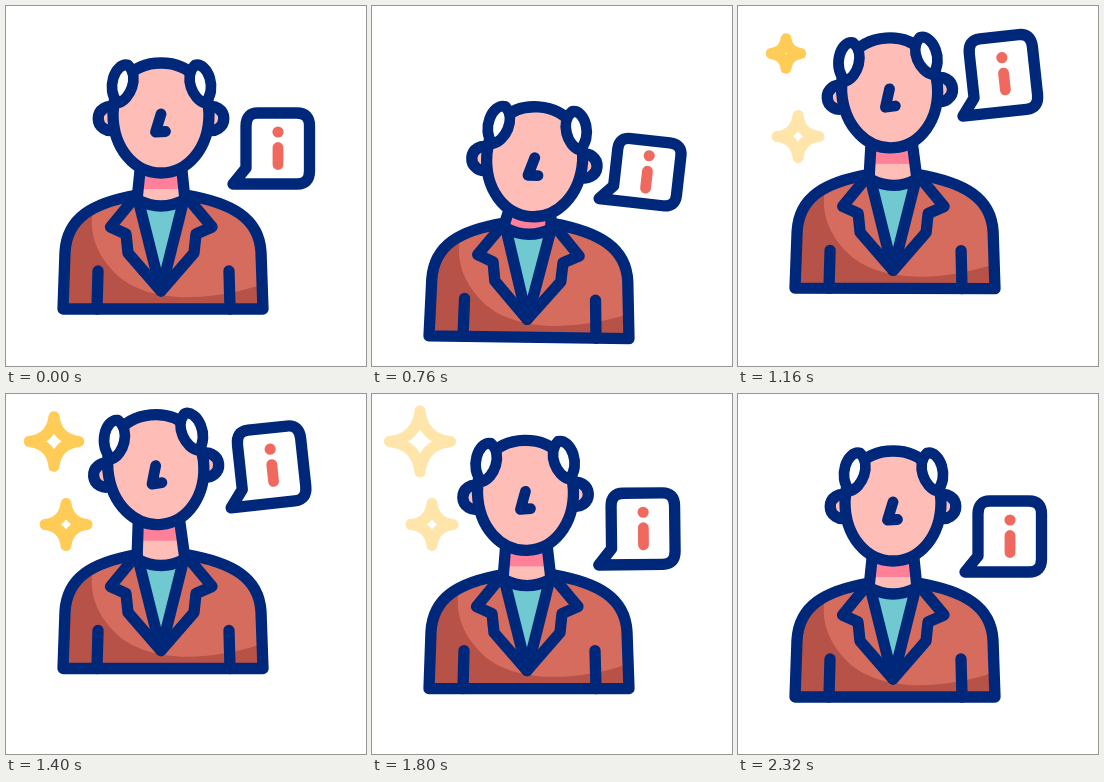
Animation of 360 by 360 pixels, one loop 2400 ms. Source, as an HTML page with a canvas:

```html
<!DOCTYPE html>
<html lang="en">
<head>
<meta charset="utf-8">
<title>Information</title>
<style>
  html, body { margin: 0; width: 100%; height: 100%; overflow: hidden; background: #fff; }
  canvas { display: block; width: 360px; height: 360px; }
</style>
</head>
<body>
<canvas id="stage"></canvas>
<script>
const LOOP = 2400, STEP = 40;
const NAVY = '#00287a', SKIN = '#ffbdb8', BLUSH = '#ff8098', COAT = '#d66c5e',
      SHADE = '#b75249', SHIRT = '#70c8d1', RED = '#f0695f', GOLD = '#ffcc57';

const canvas = document.getElementById('stage');
const ctx = canvas.getContext('2d');
const dpr = window.devicePixelRatio || 1;
canvas.width = canvas.height = 360 * dpr;

// Progress 0..1 between two times, slow at both ends
function ease(t, from, to) {
  const u = Math.min(1, Math.max(0, (t - from) / (to - from)));
  return (1 - Math.cos(Math.PI * u)) / 2;
}

// Every part sinks to a low pose, jumps to a high pose and settles at rest
function bounce(sunk, top, fall, rest) {
  return (t, low, high) => {
    const sink = ease(t, 220, sunk), jump = ease(t, 740, top), settle = ease(t, fall, rest);
    return low * sink * (1 - jump) + high * jump * (1 - settle);
  };
}
const bodyMove = bounce(640, 1300, 1340, 2060);
const headMove = bounce(740, 1300, 1340, 2060);
const bubbleMove = bounce(500, 1240, 1240, 1940);

const shapes = {
  torso: new Path2D('M131 189 C86 197 61 212 59 246 L57 303 H257 L255 246 C253 212 226 197 180 189'),
  shade: new Path2D('M50 185 H93 C78 218 87 247 112 270 C143 297 204 297 260 277 V310 H50 Z'),
  shirt: new Path2D('M132 194 Q155 206 178 194 L155 285 Z'),
  collar: new Path2D('M132 194 Q155 206 178 194'),
  opening: new Path2D('M132 193 L155 285 L178 193'),
  lapels: new Path2D('M130 190 L104.5 221 L120 228 L122 247 L155 285 L188 247 L190 228 L206 221 L180 190'),
  arms: new Path2D('M92 265 L91 303 M223 265 L224 303'),
  face: new Path2D('M155 57 C187 57 203 82 203 108 C203 143 181 167 155 167 C129 167 107 143 107 108 C107 82 123 57 155 57 Z'),
  ears: new Path2D('M109 101.5 A12 12 0 1 0 109 123.5 M201 101.5 A12 12 0 1 1 201 123.5'),
  hair: new Path2D('M122 59 C109 56 99 84 112 97 C124 94 134 71 122 59 Z'),
  nose: new Path2D('M155 108 L149.5 126 L159.5 125.5'),
  bubble: new Path2D('M252 107 H291 Q303.5 107 303.5 120 V165 Q303.5 178 291 178 H227 L240 162 V120 Q240 107 252 107 Z'),
  bar: new Path2D('M272 141.5 V158.5')
};

function fill(path, color) {
  ctx.fillStyle = color;
  ctx.fill(path);
}

function line(path, color = NAVY, width = 11.3) {
  ctx.strokeStyle = color;
  ctx.lineWidth = width;
  ctx.stroke(path);
}

function inside(path, draw) {
  ctx.save();
  ctx.clip(path);
  draw();
  ctx.restore();
}

function posed(cx, cy, dx, dy, turn, draw) {
  ctx.save();
  ctx.translate(cx + dx, cy + dy);
  ctx.rotate(turn * Math.PI / 180);
  ctx.translate(-cx, -cy);
  draw();
  ctx.restore();
}

function drawTorso() {
  fill(shapes.torso, COAT);
  inside(shapes.torso, () => fill(shapes.shade, SHADE));
  fill(shapes.lapels, COAT);
  fill(shapes.shirt, SHIRT);
}

// The neck stretches between the moving head and the collar
function drawNeck(dx, dy, base) {
  const top = 155 + dy, low = 194 + base;
  const neck = new Path2D();
  neck.moveTo(135 + dx, top);
  neck.lineTo(131, low);
  neck.quadraticCurveTo(155, low + 12, 179, low);
  neck.lineTo(175 + dx, top);
  fill(neck, SKIN);
  inside(neck, () => {
    ctx.fillStyle = BLUSH;
    ctx.fillRect(110, top - 15, 100, 43);
  });
  line(new Path2D(`M${135 + dx} ${top} L131 ${low} M${175 + dx} ${top} L179 ${low}`));
}

function drawSeams() {
  [shapes.torso, shapes.lapels, shapes.opening, shapes.collar, shapes.arms].forEach(p => line(p));
}

function drawHair() {
  fill(shapes.hair, '#fff');
  line(shapes.hair, NAVY, 10.8);
}

function drawHead() {
  for (const part of [shapes.ears, shapes.face]) {
    fill(part, SKIN);
    line(part);
  }
  drawHair();
  ctx.save();
  ctx.translate(311, 0);
  ctx.scale(-1, 1);
  drawHair();
  ctx.restore();
  line(shapes.nose, NAVY, 10.8);
}

function drawBubble(stretch) {
  const frame = new Path2D();
  frame.addPath(shapes.bubble, new DOMMatrix().translate(0, 143).scale(1, stretch).translate(0, -143));
  fill(frame, '#fff');
  line(frame);
  line(shapes.bar, RED, 10.8);
  ctx.fillStyle = RED;
  ctx.beginPath();
  ctx.arc(272, 126, 5.6, 0, Math.PI * 2);
  ctx.fill();
}

function drawStar(x, y, r, alpha) {
  const c = r * 0.1;
  const path = new Path2D(`M0 ${-r} Q${c} ${-c} ${r} 0 Q${c} ${c} 0 ${r} Q${-c} ${c} ${-r} 0 Q${-c} ${-c} 0 ${-r} Z`);
  ctx.save();
  ctx.globalAlpha = alpha;
  ctx.translate(x, y);
  line(path, GOLD, 11);
  ctx.restore();
}

function render(t) {
  ctx.setTransform(dpr, 0, 0, dpr, 0, 0);
  ctx.fillStyle = '#fff';
  ctx.fillRect(0, 0, 360, 360);
  ctx.lineCap = ctx.lineJoin = 'round';

  const fade = 1 - ease(t, 1720, 1880);
  drawStar(48, 47.5, 12 + 18.5 * ease(t, 1000, 1640), fade * ease(t, 1000, 1100));
  drawStar(60, 130.5, 21, fade * ease(t, 1060, 1260));

  const by = bodyMove(t, 28.5, -29), lean = bodyMove(t, 0.8, 0);
  const hx = headMove(t, 7.5, -5), hy = headMove(t, 44, -37);
  posed(157, 303, 0, by, lean, drawTorso);
  drawNeck(hx / 2, hy, by);
  posed(157, 303, 0, by, lean, drawSeams);
  posed(155, 112, hx, hy, headMove(t, 4.2, -5.8), drawHead);
  posed(272, 150.5, bubbleMove(t, 2.5, -6), bubbleMove(t, 24, -81), bubbleMove(t, 6.5, -7),
    () => drawBubble(1 + bubbleMove(t, -0.11, 0.07)));
}

const start = performance.now();
function tick() {
  const t = Math.max(0, performance.now() - start) % LOOP;
  render(Math.floor(t / STEP) * STEP);
  requestAnimationFrame(tick);
}
tick();
</script>
</body>
</html>
```
